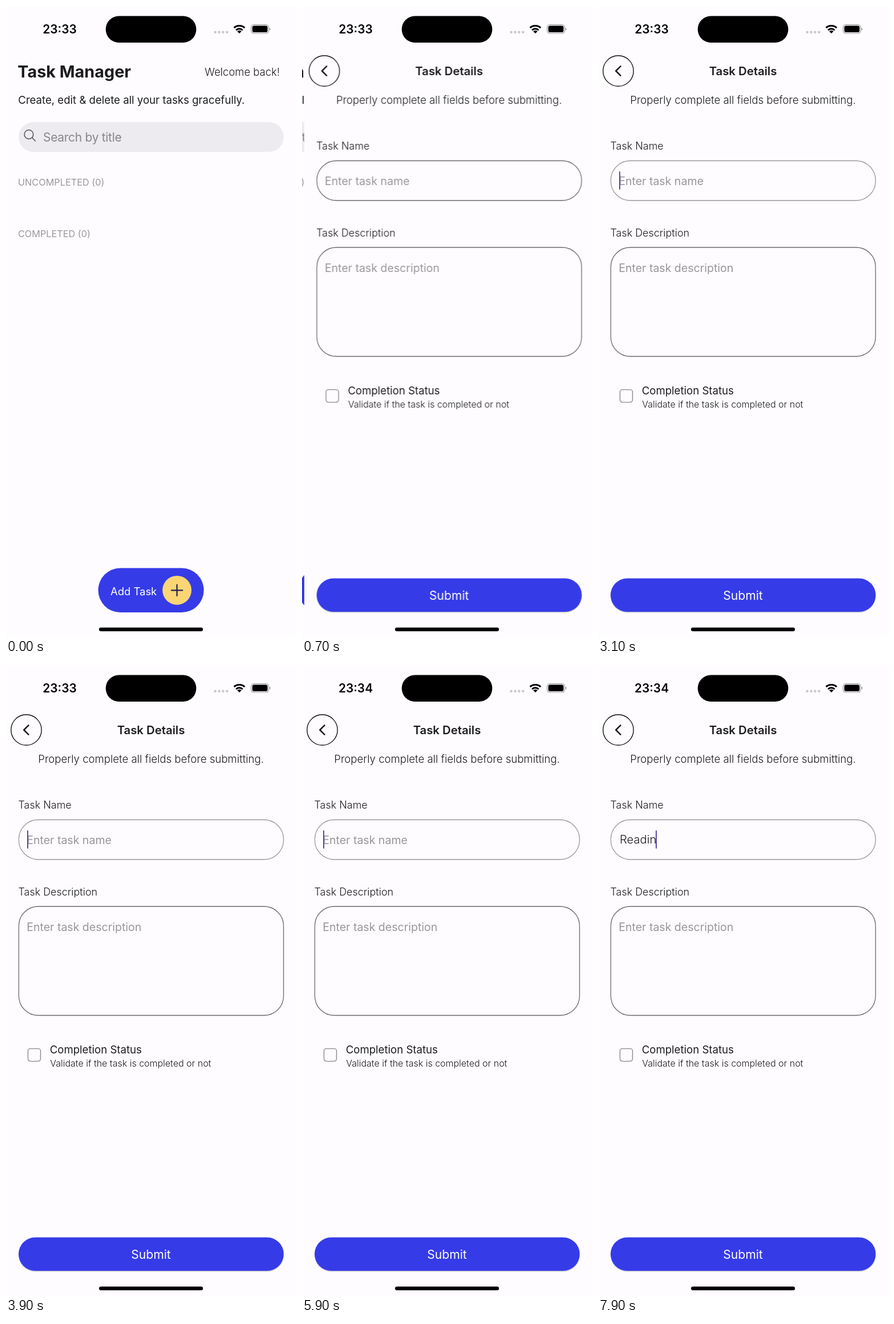
Animation of 508 by 1103 pixels, one loop 8 s. Source, as an HTML page:

```html
<!DOCTYPE html>
<html lang="en">
<head>
<meta charset="utf-8">
<title>Task Manager</title>
<style>
  html, body { margin: 0; width: 100%; height: 100%; overflow: hidden; background: #fefcff; }
  body { position: relative; font-family: Inter, "Noto Sans", sans-serif; }
  .page, svg { position: absolute; left: 0; top: 0; width: 508px; height: 1103px; }
  .page { background: #fefcff; }
  text { fill: #1c1b1f; white-space: pre; }
  .mid { text-anchor: middle; }
  .light { font-weight: 300; }
  .semi { font-weight: 600; }
  .bold { font-weight: 700; }
  .white { fill: #fff; }
  .hint { fill: #98969a; font-size: 19.55px; }
  .group { fill: #9a989c; font-size: 16.25px; }
  .label { font-size: 17.95px; font-weight: 300; }
  .blue { fill: #363be8; }
  .line { fill: none; stroke: #6b696f; stroke-width: 1.3; }
  .icon { fill: none; stroke-linecap: round; stroke-linejoin: round; }

  /* every timeline is an 8 s loop of hard steps */
  .t { animation: 8s step-end infinite; }
  #home { animation-name: leave; }
  #form { animation-name: enter; }
  #name { animation-name: focus; }
  #before { animation-name: clock-out; }
  #after { animation-name: clock-in; }
  #prompt { animation-name: prompt; }
  #waiting { animation-name: waiting; }
  #typing { animation-name: typing; }
  @keyframes leave {
    0% { transform: none; }
    6.25% { transform: translateX(-49px); }
    8.75%, 100% { transform: translateX(-168px); }
  }
  @keyframes enter {
    0% { transform: translateX(508px); }
    6.25% { transform: translateX(368px); }
    8.75% { transform: translateX(3.6px); }
    11.25%, 100% { transform: none; }
  }
  @keyframes focus { 0% { stroke: #6b696f; } 21.25%, 100% { stroke: #99979b; } }
  @keyframes clock-out { 0% { opacity: 1; } 56.25%, 100% { opacity: 0; } }
  @keyframes clock-in { 0% { opacity: 0; } 56.25%, 100% { opacity: 1; } }
  @keyframes prompt { 0% { opacity: 1; } 81.25%, 100% { opacity: 0; } }
  @keyframes waiting { 0% { opacity: 0; } 21.25% { opacity: 1; } 81.25%, 100% { opacity: 0; } }
  @keyframes typing { 0% { opacity: 0; } 81.25%, 100% { opacity: 1; } }
  @keyframes blink {
    0%, 90%, 100% { opacity: 1; }
    30%, 70% { opacity: .67; }
    50% { opacity: 0; }
  }

  /* letters appear one by one and push the caret along */
  #entry { position: absolute; left: 38px; top: 289px; height: 32px; line-height: 32px;
    font-size: 20.2px; font-weight: 300; color: #1c1b1f; white-space: nowrap; }
  #entry span { font-size: 0; }
  #entry span:nth-child(1) { animation-name: key1; }
  #entry span:nth-child(2) { animation-name: key2; }
  #entry span:nth-child(3) { animation-name: key3; }
  #entry span:nth-child(4) { animation-name: key4; }
  #entry span:nth-child(5) { animation-name: key5; }
  #entry span:nth-child(6) { animation-name: key6; }
  @keyframes key1 { 0% { font-size: 0; } 81.25%, 100% { font-size: 20.2px; } }
  @keyframes key2 { 0% { font-size: 0; } 86.25%, 100% { font-size: 20.2px; } }
  @keyframes key3 { 0% { font-size: 0; } 88.75%, 100% { font-size: 20.2px; } }
  @keyframes key4 { 0% { font-size: 0; } 93.75%, 100% { font-size: 20.2px; } }
  @keyframes key5 { 0% { font-size: 0; } 96.25%, 100% { font-size: 20.2px; } }
  @keyframes key6 { 0% { font-size: 0; } 98.75%, 100% { font-size: 20.2px; } }
  #caret { display: inline-block; position: relative; width: 0; height: 32px; vertical-align: top; }
  #caret div { position: absolute; left: -1.3px; top: 0; width: 2.6px; height: 32px; }
  #caret i { display: block; height: 100%; border-radius: 1.3px; background: #5b4aa6; }
  #waiting i { animation: blink 1s step-end infinite; }
</style>
</head>
<body>

<div id="home" class="page t">
  <svg viewBox="0 0 508 1103">
    <text class="bold" x="20.3" y="125" font-size="28.8">Task Manager</text>
    <text class="light" x="348" y="122" font-size="18.45">Welcome back!</text>
    <text x="21.3" y="170.5" font-size="18.6">Create, edit &amp; delete all your tasks gracefully.</text>
    <rect x="22" y="203" width="464.5" height="52" rx="26" fill="#edebef"/>
    <g class="icon" stroke="#5d5b60" stroke-width="1.7">
      <circle cx="40" cy="224.5" r="7.8"/>
      <path d="M45.7 230.2 L51.5 236"/>
    </g>
    <text x="65" y="236.5" font-size="21" letter-spacing="-.3" style="fill:#878589">Search by title</text>
    <text class="group" x="21" y="314">UNCOMPLETED (0)</text>
    <text class="group" x="21" y="404">COMPLETED (0)</text>
    <rect class="blue" x="161.5" y="982.5" width="185" height="77.5" rx="38.7"/>
    <text class="white" x="183" y="1029.5" font-size="18.45">Add Task</text>
    <circle cx="299.5" cy="1021.3" r="25.4" fill="#fbd574"/>
    <path class="icon" d="M289.8 1021.3 h19.4 M299.5 1011.6 v19.4" stroke="#1f2050" stroke-width="2.2"/>
  </svg>
</div>

<div id="form" class="page t">
  <svg viewBox="0 0 508 1103">
    <circle cx="35.5" cy="113.5" r="26.7" fill="none" stroke="#111" stroke-width="1.4"/>
    <path class="icon" d="M39.5 105.3 L31.3 113.5 L39.5 121.7" stroke="#1c1b1f" stroke-width="2.5"/>
    <text class="semi mid" x="254" y="121" font-size="20.3">Task Details</text>
    <text class="light mid" x="254" y="170.5" font-size="18.58">Properly complete all fields before submitting.</text>

    <text class="label" x="21.5" y="251.3">Task Name</text>
    <rect id="name" class="line t" x="22.4" y="270.5" width="463.8" height="69.5" rx="34"/>
    <text id="prompt" class="hint t" x="36.2" y="312.7">Enter task name</text>

    <text class="label" x="21.5" y="402.8">Task Description</text>
    <rect class="line" x="22.4" y="422" width="463.8" height="190.5" rx="34"/>
    <text class="hint" x="36.2" y="464.5">Enter task description</text>

    <rect x="38.5" y="670.6" width="22" height="22" rx="4" fill="none" stroke="#8b898e" stroke-width="1.4"/>
    <text x="76.7" y="679" font-size="18.6">Completion Status</text>
    <text class="light" x="77.3" y="701.5" font-size="15.98">Validate if the task is completed or not</text>

    <rect x="22" y="1002" width="464.5" height="58.7" rx="29.3" fill="#000" opacity=".16"/>
    <rect class="blue" x="22" y="1000.5" width="464.5" height="58.5" rx="29.2"/>
    <text class="white mid" x="254" y="1038" font-size="21.1">Submit</text>
  </svg>
  <div id="entry"><span class="t">R</span><span class="t">e</span><span class="t">a</span><span class="t">d</span><span class="t">i</span><span class="t">n</span><b id="caret"><div id="waiting" class="t"><i></i></div><div id="typing" class="t"><i></i></div></b></div>
</div>

<svg viewBox="0 0 508 1103">
  <g class="semi mid" font-size="20.9">
    <text id="before" class="t" x="94" y="48" style="fill:#000">23:33</text>
    <text id="after" class="t" x="94" y="48" style="fill:#000">23:34</text>
  </g>
  <rect x="174.7" y="17.5" width="158.6" height="46.5" rx="23.2"/>
  <path class="icon" d="M366.5 45.7 H388" stroke="#c9c8cb" stroke-width="4.6" stroke-dasharray="0 6.9"/>
  <g fill="none" stroke="#000" stroke-width="3">
    <path d="M399.5 38.2 A13.3 13.3 0 0 1 418 38.2"/>
    <path d="M403 42.2 A8.2 8.2 0 0 1 414.5 42.2"/>
  </g>
  <path d="M408.8 48 L405 44.2 A5.4 5.4 0 0 1 412.6 44.2 Z"/>
  <rect x="429.4" y="32.6" width="30.8" height="15.4" rx="5" fill="none" stroke="#9b9a9d" stroke-width="1.2"/>
  <rect x="431.4" y="34.6" width="26.8" height="11.4" rx="3.2"/>
  <path d="M461.6 37.7 A2.8 2.8 0 0 1 461.6 42.9 Z" fill="#9b9a9d"/>
  <rect x="163" y="1086.5" width="182" height="6.4" rx="3.2"/>
</svg>

</body>
</html>
```
